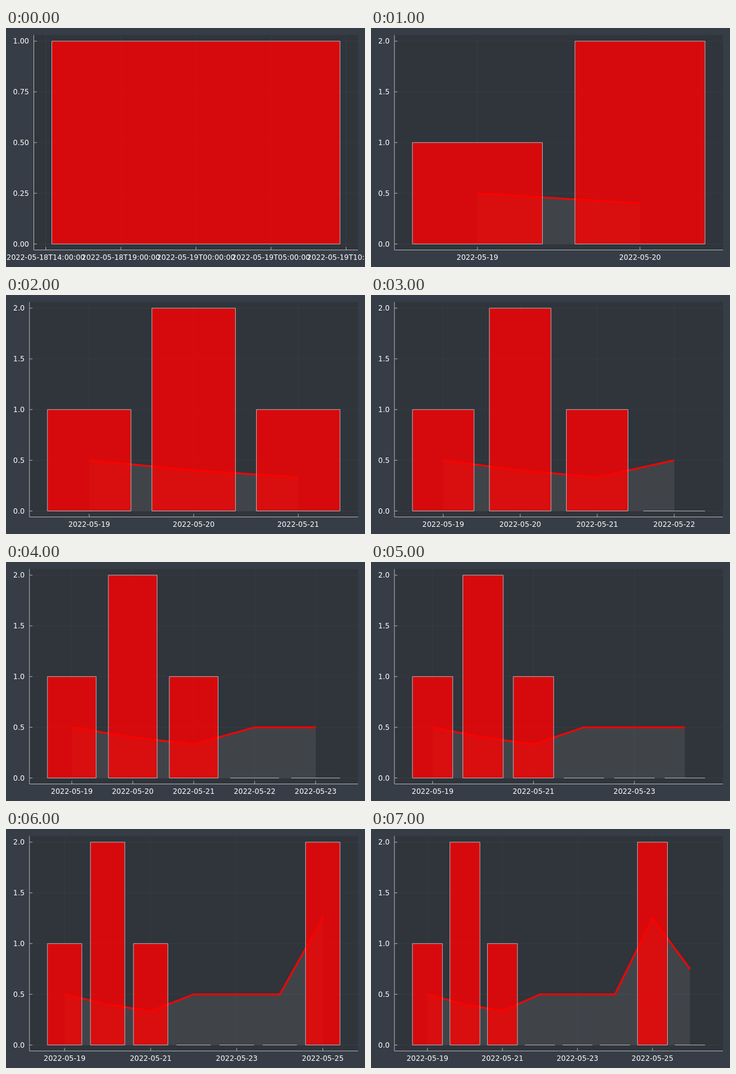
Recreate the animation shown at these times as an HTML page with a canvas. Size 600 by 400 pixels, loop 8000 ms.

```html
<!DOCTYPE html>
<html lang="en">
<head>
<meta charset="utf-8">
<title>Daily bars with running line</title>
<style>
  html, body { margin: 0; overflow: hidden; background: #363d46; }
  canvas { display: block; }
</style>
</head>
<body>
<canvas id="chart" width="600" height="400"></canvas>
<script>
const ctx = document.getElementById('chart').getContext('2d');
const counts = [1, 2, 1, 0, 0, 0, 2, 0];
const means = [0.5, 0.4, 1 / 3, 0.5, 0.5, 0.5, 1.25, 0.75];
const plotTop = 11.8, plotRight = 588.2, plotBottom = 371.5;
const zeroY = 361.5, fullHeight = 339.5;
const fg = '#adb2b7';

function path(points, color, width) {
  ctx.beginPath();
  points.forEach(([x, y]) => ctx.lineTo(x, y));
  ctx.strokeStyle = color;
  ctx.lineWidth = width;
  ctx.stroke();
}

function label(text, x, y, align) {
  ctx.fillStyle = '#fff';
  ctx.textAlign = align;
  ctx.fillText(text, x, y);
}

function draw(n) {
  const single = n === 1;
  const plotLeft = single ? 46.5 : 39.2;
  const max = single ? 1 : 2;
  const barsLeft = single ? 76.5 : 69.2, barsRight = 558.2;
  const step = (barsRight - barsLeft) / (n - 0.2);
  const dayX = i => barsLeft + (i + 0.4) * step;
  const valueY = v => zeroY - v / max * fullHeight;

  const xTicks = [];
  if (single) {
    ['18T14', '18T19', '19T00', '19T05', '19T10'].forEach((hour, i) =>
      xTicks.push([66.5 + i * 125.5, `2022-05-${hour}:00:00`]));
  } else {
    for (let i = 0; i < n; i += n > 5 ? 2 : 1) xTicks.push([dayX(i), `2022-05-${19 + i}`]);
  }
  const yTicks = [0, 1, 2, 3, 4].map(i => i * max / 4);

  ctx.fillStyle = '#363d46';
  ctx.fillRect(0, 0, 600, 400);
  ctx.fillStyle = '#30343b';
  ctx.fillRect(plotLeft, plotTop, plotRight - plotLeft, plotBottom - plotTop);

  const grid = 'rgba(173,178,183,0.06)';
  xTicks.forEach(([x]) => path([[x, plotTop], [x, plotBottom]], grid, 1));
  yTicks.forEach(v => path([[plotLeft, valueY(v)], [plotRight, valueY(v)]], grid, 1));

  path([[plotLeft, plotTop], [plotLeft, plotBottom], [plotRight, plotBottom]], fg, 1);
  ctx.font = '12px "DejaVu Sans", sans-serif';
  xTicks.forEach(([x, text]) => {
    path([[x, plotBottom], [x, plotBottom - 5]], fg, 1);
    label(text, x, 387.6, 'center');
  });
  yTicks.forEach(v => {
    path([[plotLeft, valueY(v)], [plotLeft + 5, valueY(v)]], fg, 1);
    label(v.toFixed(single ? 2 : 1), plotLeft - 8, valueY(v) + 4.4, 'right');
  });

  if (!single) {
    const line = means.slice(0, n).map((v, i) => [dayX(i), valueY(v)]);
    ctx.beginPath();
    [[dayX(0), zeroY], ...line, [dayX(n - 1), zeroY]].forEach(([x, y]) => ctx.lineTo(x, y));
    ctx.fillStyle = 'rgba(128,128,128,0.2)';
    ctx.fill();
    path(line, '#f00', 3);
  }

  counts.slice(0, n).forEach((v, i) => {
    const a = dayX(i) - 0.4 * step, b = a + 0.8 * step, y = valueY(v);
    ctx.fillStyle = 'rgba(255,0,0,0.8)';
    ctx.fillRect(a, y, b - a, zeroY - y);
    path(v ? [[a, zeroY], [a, y], [b, y], [b, zeroY], [a, zeroY]] : [[a, zeroY], [b, zeroY]], fg, 1);
  });
}

function tick() {
  draw(1 + Math.floor(performance.now() % 8000 / 1000));
  requestAnimationFrame(tick);
}
tick();
</script>
</body>
</html>
```
